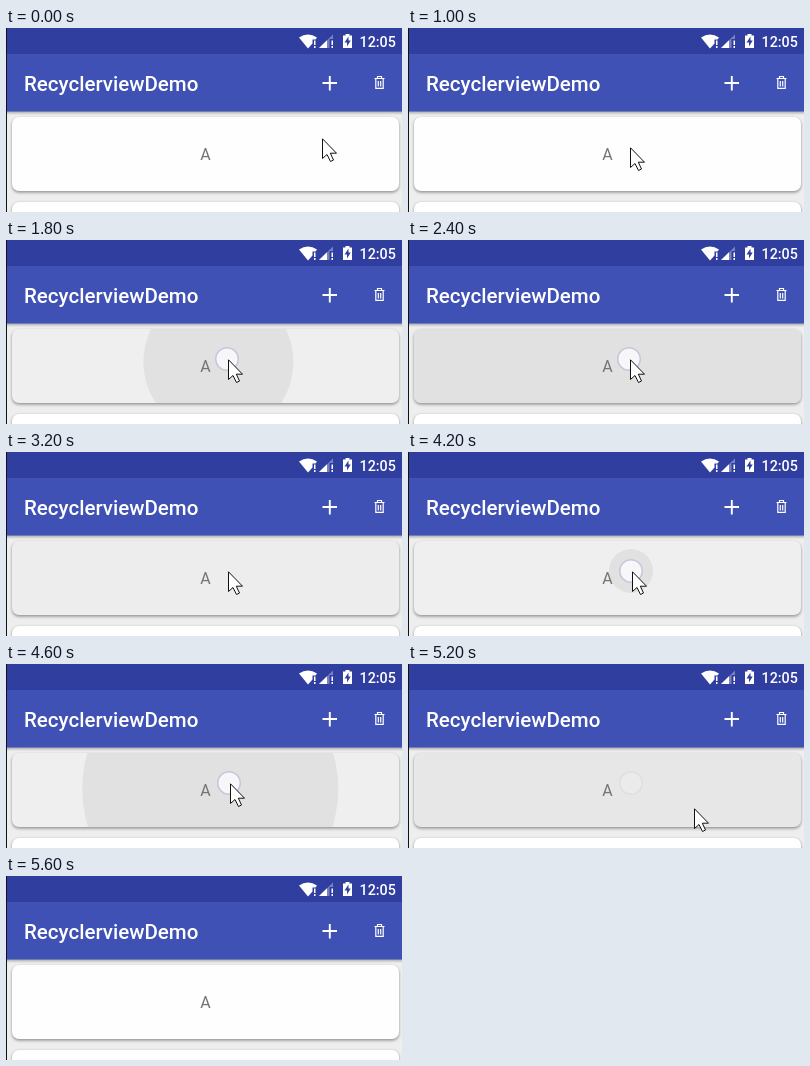
An HTML page for the animation above (6200 ms loop, 396 by 184 pixels).

```html
<!DOCTYPE html>
<html lang="en">
<head>
<meta charset="utf-8">
<title>RecyclerviewDemo</title>
<style>
html, body { margin: 0; width: 100%; height: 100%; overflow: hidden; background: #eee; }
svg { display: block; width: 396px; height: 184px; }
text { font-family: Roboto, "Noto Sans", sans-serif; }
</style>
</head>
<body>
<svg viewBox="0 0 396 184">
  <defs>
    <linearGradient id="fall" x2="0" y2="1">
      <stop offset="0" stop-color="#000" stop-opacity=".3"/>
      <stop offset="1" stop-color="#000" stop-opacity="0"/>
    </linearGradient>
    <filter id="soft" x="-5%" y="-20%" width="110%" height="140%">
      <feGaussianBlur stdDeviation="1.8"/>
    </filter>
    <clipPath id="cardClip"><rect x="6" y="89" width="387" height="74" rx="7"/></clipPath>
  </defs>

  <rect width="396" height="184" fill="#eee"/>
  <g filter="url(#soft)" opacity=".4">
    <rect x="6" y="90.5" width="387" height="74" rx="7"/>
    <rect x="6" y="175" width="387" height="74" rx="7"/>
  </g>
  <rect id="card" x="6" y="89" width="387" height="74" rx="7"/>
  <g clip-path="url(#cardClip)"><circle id="ripple" fill="#e1e1e1"/></g>
  <rect x="6" y="174" width="387" height="74" rx="7" fill="#fff"/>
  <text x="199.5" y="132" font-size="16" fill="#757575" text-anchor="middle">A</text>

  <rect y="83" width="396" height="4" fill="url(#fall)"/>
  <rect width="396" height="83.5" fill="#3f51b5"/>
  <rect width="396" height="26" fill="#303f9f"/>
  <g fill="#fff" font-weight="500">
    <text x="18" y="63" font-size="20.5">RecyclerviewDemo</text>
    <text x="353.5" y="18.5" font-size="14.3">12:05</text>
  </g>

  <g fill="#fff">
    <path d="M293 9.5Q302 3.5 311 9.5L309.5 11.5H306.5V15.500L302 20.5Z"/>
    <path d="M313 20L327 6.5V11H323.5V20Z" opacity=".35"/>
    <path d="M313 20L321 12.3V20Z"/>
    <path id="bang" d="M308 12.5h1.500v4.500h-1.500zM308 18h1.500v2h-1.500z"/>
    <use href="#bang" x="17.500"/>
    <path d="M339.5 6h4v1.5h2.5V20H337V7.5h2.5z"/>
    <path d="M342.5 8.5L338.5 14.5H341V18.5L344.7 12.5H342.5Z" fill="#303f9f"/>
  </g>
  <path d="M316.500 55H331M323.800 48V62.500" stroke="#fff" stroke-width="1.900"/>
  <path d="M368.500 50.500H378.500M371.500 50V48.500H375.500V50M369.800 51V60.300H377.200V51M372.300 53V58.500M374.700 53V58.500"
    fill="none" stroke="#fff" stroke-width="1.200"/>

  <circle id="touch" cy="119" r="11.300" fill="#f7f7f9" stroke="#c6c6de" stroke-width="1.500"/>
  <path id="cursor" d="M.5 .8V20.5L5 16.5L8.5 23.5L11.5 22L8.3 15.2H14.5Z"
    fill="#fff" stroke="#111"/>
  <rect width="1" height="184" fill="#111"/>
</svg>
<script>
const LOOP = 6200, STEP = 200;
const [card, ripple, touch, cursor] =
  ["card", "ripple", "touch", "cursor"].map(id => document.getElementById(id));

// cursor path: t in ms, position of the tip
const path = [
  { t: 0, x: 316, y: 110 }, { t: 800, x: 196, y: 116 },
  { t: 1000, x: 222, y: 119 }, { t: 3800, x: 222, y: 119 },
  { t: 4000, x: 224, y: 119 }, { t: 5000, x: 224, y: 119 },
  { t: 5600, x: 410, y: 194 }
];
const presses = [
  { x: 221, start: 1400, hold: 1600, fade: 600 },
  { x: 223, start: 4000, hold: 1200, fade: 400 }
];

const clamp = (v, lo, hi) => Math.min(hi, Math.max(lo, v));
const mix = (a, b, u) => a + (b - a) * u;

function set(el, attrs) {
  for (const key in attrs) el.setAttribute(key, attrs[key]);
}

function tip(t) {
  const i = path.findIndex(p => p.t > t);
  if (i < 0) return path.at(-1);
  const a = path[i - 1], b = path[i], u = (t - a.t) / (b.t - a.t);
  return { x: mix(a.x, b.x, u), y: mix(a.y, b.y, u) };
}

// grey of the card, ripple radius and touch opacity
function pressed(p, t) {
  const age = t - p.start;
  if (age < 0) return { grey: 254, r: 0, shown: 0 };
  if (age < p.hold)
    return { grey: Math.max(239, 247 - age * .04), r: clamp(age * .265 - 31, 0, 230), shown: 1 };
  const u = clamp((age - p.hold) / p.fade, 0, 1);
  return { grey: mix(231, 254, u ** 1.3), r: 0, shown: Math.max(0, .25 - u) };
}

function draw(time) {
  const t = Math.floor(time / STEP) * STEP;
  const { x, y } = tip(t);
  const p = presses.findLast(q => q.start <= t) || presses[0];
  const { grey, r, shown } = pressed(p, t);
  // the ripple drifts from the finger to the card's centre as it grows
  const drift = clamp((r - 22) / 130, 0, 1);
  set(cursor, { transform: `translate(${x} ${y})` });
  set(card, { fill: `rgb(${grey},${grey},${grey})` });
  set(ripple, { cx: mix(p.x, 200, drift), cy: mix(119, 126, drift), r });
  set(touch, { cx: p.x, opacity: shown });
}

const start = performance.now();
function tick() {
  draw((performance.now() - start) % LOOP);
  requestAnimationFrame(tick);
}
tick();
</script>
</body>
</html>
```
